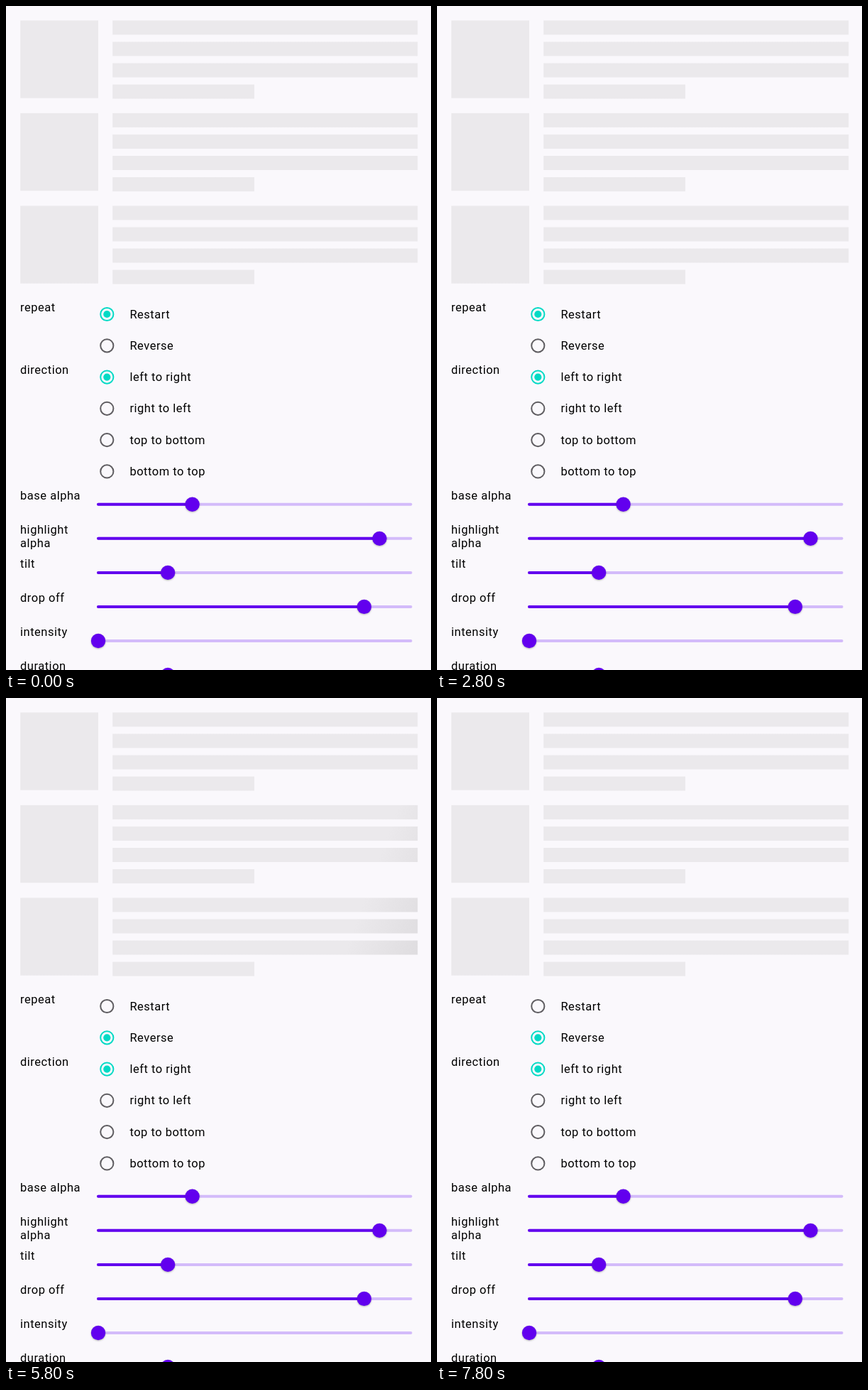
Recreate the animation shown at these times as an HTML page. Size 599 by 935 pixels, loop 8 s.

```html
<!DOCTYPE html>
<html lang="en">
<head>
<meta charset="utf-8">
<title>Shimmer settings</title>
<style>
  html, body { margin: 0; width: 100%; height: 100%; overflow: hidden; background: #faf8fc; }
  svg { display: block; }
  text { font: 16.5px Roboto, sans-serif; letter-spacing: .515px; fill: #000; white-space: pre; }
  .ring { fill: none; stroke: #5f5d61; stroke-width: 2; }
  .dot { fill: none; }
  .on .ring { stroke: #03dac5; }
  .on .dot { fill: #03dac5; }
  .track { stroke: #d3bbfa; stroke-width: 4; stroke-linecap: round; }
  .fill { stroke: #6200ee; stroke-width: 4; stroke-linecap: round; }
  .thumb { fill: #6200ee; filter: drop-shadow(0 1px 1px rgba(0, 0, 0, .28)); }
</style>
</head>
<body>
<svg id="stage" width="599" height="935" viewBox="0 0 599 935">
  <defs>
    <linearGradient id="shine" gradientUnits="userSpaceOnUse" x1="-238" y1="0" x2="238" y2="0">
      <stop offset="0" stop-color="#ebe9ec"/>
      <stop offset=".5" stop-color="#cdcbce"/>
      <stop offset="1" stop-color="#ebe9ec"/>
    </linearGradient>
  </defs>
</svg>
<script>
const LOOP = 8000, STEP = 200, SPEED = 1.04, SWITCH_AT = 3200;
const stage = document.getElementById('stage');
const shine = document.getElementById('shine');

function add(parent, tag, attrs, label) {
  const el = document.createElementNS('http://www.w3.org/2000/svg', tag);
  for (const key in attrs) el.setAttribute(key, attrs[key]);
  if (label) el.textContent = label;
  parent.append(el);
  return el;
}

const write = (x, y, label) => add(stage, 'text', { x, y }, label);

// Placeholder cards
const cards = add(stage, 'g', { fill: 'url(#shine)' });
const block = (x, y, width, height) => add(cards, 'rect', { x, y, width, height });
for (let card = 0; card < 3; card++) {
  const top = 20.4 + card * 130.5;
  block(20.2, top, 109.8, 109.3);
  for (let row = 0; row < 4; row++) block(150.2, top + row * 30.05, row < 3 ? 430 : 199.8, 20);
}

// Radio groups
write(20, 429.6, 'repeat');
write(20, 518, 'direction');
const radios = ['Restart', 'Reverse', 'left to right', 'right to left', 'top to bottom', 'bottom to top']
  .map((label, i) => {
    const cy = 434 + i * 44.28, cx = 142.3;
    const radio = add(stage, 'g', {});
    add(radio, 'circle', { class: 'ring', cx, cy, r: 9.1 });
    add(radio, 'circle', { class: 'dot', cx, cy, r: 5.1 });
    write(174.4, cy + 5.5, label);
    return radio;
  });
const check = (i, on) => radios[i].classList.toggle('on', on);
check(2, true);

// Sliders: label lines and value
const sliders = [
  ['base alpha', .3], ['highlight\nalpha', .897], ['tilt', .222],
  ['drop off', .848], ['intensity', 0], ['duration', .222]
];
sliders.forEach(([label, value], i) => {
  const y = 701.8 + i * 48.04, x = 130 + value * 442;
  label.split('\n').forEach((line, n) => write(20, y - 6.7 + n * 19.2, line));
  add(stage, 'line', { class: 'track', x1: 130, x2: 570.5, y1: y, y2: y });
  add(stage, 'line', { class: 'fill', x1: 130, x2: x, y1: y, y2: y });
  add(stage, 'circle', { class: 'thumb', cx: x, cy: y, r: 10.2 });
});

// Sweeps: start time, position of the band, direction
const sweeps = [
  [0, -1016, 1],
  [2800, -390, 1],
  [3200, -271, 1],
  [4400, 850, 0],
  [6200, 961, -1]
];

function draw() {
  const t = Math.floor(performance.now() % LOOP / STEP) * STEP;
  const [start, from, dir] = sweeps.filter(s => s[0] <= t).pop();
  const x = from + dir * SPEED * (t - start);
  shine.setAttribute('gradientTransform', `translate(${x} 30) rotate(20)`);
  check(0, t < SWITCH_AT);
  check(1, t >= SWITCH_AT);
  requestAnimationFrame(draw);
}
draw();
</script>
</body>
</html>
```
